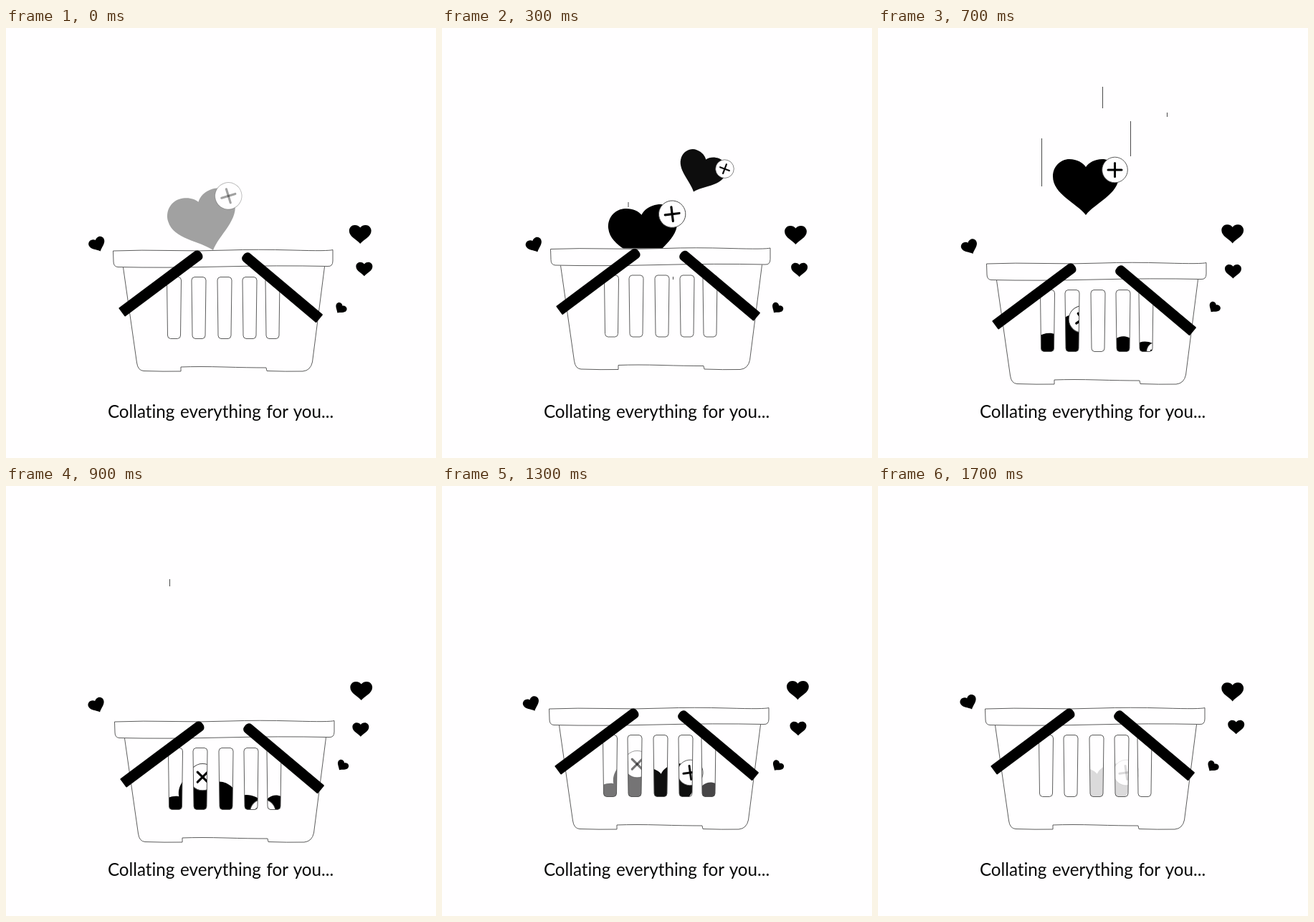
Write an HTML page with a canvas that moves like this. It is 600 px wide and 600 px high and loops after 1.8 s.

```html
<!DOCTYPE html>
<html lang="en">
<head>
<meta charset="utf-8">
<title>Collating</title>
<style>
  html, body { margin: 0; width: 600px; height: 600px; overflow: hidden; background: #fffeff; }
  canvas { display: block; }
  p {
    position: absolute; left: 0; top: 520px; width: 599px; margin: 0;
    font: 400 24.2px/30px Lato, sans-serif; word-spacing: 1.5px;
    font-variant-ligatures: none;
    text-align: center; white-space: nowrap; color: #080808;
  }
</style>
</head>
<body>
<canvas id="stage" width="600" height="600"></canvas>
<p>Collating everything for you...</p>
<script>
const ctx = document.getElementById('stage').getContext('2d');
const BG = '#fffeff', INK = '#000', LINE = '#4a4a4a';
const STEP = 100, STEPS = 18, FADE_IN = 2, FADE_OUT = 5;

// Tip at the origin, 92 wide, 78 high
const heartPath = new Path2D('M0 0C-13-17-46-29-46-54C-46-68-35-78-23-78' +
  'C-12-78-4-73 0-67C4-73 12-78 23-78C35-78 46-68 46-54C46-29 13-17 0 0Z');
const rimPath = new Path2D('M149.500 311Q190 309.500 230 310.500T310 310T400 310T456 309.500' +
  'L456 325Q456 333 449 332.500Q380 331 300 333T156 333.500Q150 333 150 326Z');
const bodyPath = new Path2D('M163.500 334L182.500 467Q184 478 192 478.500Q220 479.500 244 479' +
  'L244 473Q270 472 304 473T363 474L364 478.500Q390 479.500 414 479Q425 478 427.500 466L444.500 333');
const slots = [224.5, 259, 295, 330, 362].map(x => new Path2D(
  `M${x} 352q0-4 4-4.500h12q4 .5 4 4.500l-1 77q0 4-4 4.500h-10q-4-.5-4-4.500z`));

// Poses relative to the basket: step, tip x, tip y, turn
const hearts = [
  { scale: 1.05, born: -.74, leave: 10.7, holes: [0, 1],
    poses: [[0, 289, 310, -17], [3, 285, 333, -7], [5, 289, 465, -45], [7, 286, 467, -35], [9, 289, 465, -45]] },
  { scale: .72, born: 1.1, leave: 11.6, holes: [3, 4],
    poses: [[3, 349, 231, 21], [5, 353, 333, 0], [7, 347, 471, 13], [9, 384, 472, 10]] },
  { scale: 1, born: 3.2, leave: 12.7, holes: [2, 3, 4],
    poses: [[5, 289, 143, 8], [7, 288, 243, 0], [9, 293, 477, 25], [13, 315, 468, -8]] }
];
for (const h of hearts) {
  h.window = new Path2D();
  h.window.rect(0, -100, 600, 410);
  h.holes.forEach(i => h.window.addPath(slots[i]));
}

// Speed lines: x, then step, top, bottom at both ends of their life
const trails = [
  [260, [3, 243, 250], [5, 186, 217]],
  [322.5, [3, 347, 351], [5, 265, 335]],
  [352.5, [5, 213, 268], [7, 130, 179]],
  [403.5, [5, 127, 251], [7, 118, 124]],
  [228.5, [7, 154, 221], [9, 130, 140]],
  [313.5, [7, 82, 112], [8, 84, 95]]
];

// Hearts drifting on a slow sine
const floaters = [
  { scale: .25, turn: -24, x: 127.4, y: 304.5, dx: 2, dy: -2, lagX: 4, lagY: 0 },
  { scale: .335, turn: 0, x: 495, y: 287, dx: -1.5, dy: 2, lagX: 3, lagY: 3 },
  { scale: .25, turn: 0, x: 497.4, y: 338.3, dx: 2.5, dy: -1.8, lagX: 0, lagY: 0 },
  { scale: .18, turn: 36, x: 467.8, y: 391.2, dx: -1.3, dy: .7, lagX: 0, lagY: 0 }
];

const clamp = v => Math.min(1, Math.max(0, v));
const bump = (f, peak, width) => clamp(1 - Math.abs(f - peak) / width);
const wave = (f, lag) => Math.cos((f - lag) / STEPS * Math.PI * 2);

function ease(f, from, to) {
  const k = clamp((f - from) / (to - from));
  return k * k * (3 - 2 * k);
}

// Linear between key rows, held at both ends
function at(rows, f) {
  const i = Math.max(1, rows.findIndex(r => r[0] >= f));
  const past = f > rows[rows.length - 1][0];
  const a = rows[past ? rows.length - 2 : i - 1], b = rows[past ? rows.length - 1 : i];
  const k = clamp((f - a[0]) / (b[0] - a[0]));
  return a.slice(1).map((v, n) => v + (b[n + 1] - v) * k);
}

function scoped(x, y, turn, scale, draw) {
  ctx.save();
  ctx.translate(x, y);
  ctx.rotate(turn * Math.PI / 180);
  ctx.scale(scale, scale);
  draw();
  ctx.restore();
}

function segment(x1, y1, x2, y2) {
  ctx.beginPath();
  ctx.moveTo(x1, y1);
  ctx.lineTo(x2, y2);
  ctx.stroke();
}

function drawBadge(alpha) {
  ctx.beginPath();
  ctx.arc(0, 0, 17.8, 0, Math.PI * 2);
  ctx.fillStyle = BG;
  ctx.fill();
  ctx.globalAlpha = alpha;
  ctx.strokeStyle = LINE;
  ctx.lineWidth = .9;
  ctx.stroke();
  ctx.strokeStyle = INK;
  ctx.lineWidth = 3;
  ctx.lineCap = 'round';
  segment(-9.5, 0, 9.5, 0);
  segment(0, -9.5, 0, 9.5);
}

function drawHeart(h, f) {
  const alpha = clamp((f - h.born) / FADE_IN) * clamp(1 - (f - h.leave) / FADE_OUT);
  if (!alpha) return;
  const [x, y, turn] = at(h.poses, f);
  ctx.save();
  ctx.clip(h.window);
  scoped(x, y, turn, h.scale, () => {
    ctx.globalAlpha = alpha;
    ctx.fillStyle = INK;
    ctx.fill(heartPath);
    ctx.globalAlpha = 1;
    scoped(40.5, -63, 0, 1, () => drawBadge(alpha));
  });
  ctx.restore();
}

function drawHandle(x, y, turn) {
  scoped(x, y, turn, 1, () => {
    ctx.beginPath();
    ctx.roundRect(0, -7.5, 138.5, 15, [6, 1, 1, 6]);
    ctx.fillStyle = INK;
    ctx.fill();
  });
}

function drawBasket(f) {
  const x = 2 * (ease(f, 0, 3) - ease(f, 9, 13));
  const y = 18 * (ease(f, 4.6, 6.2) - ease(f, 9, 12)) - 2.5 * bump(f, 3, 2) + 8 * bump(f, 8, 1);
  const swing = 6 * bump(f, 5, 2) + 3 * bump(f, 8, 1);
  scoped(x, y, 0, 1, () => {
    hearts.forEach(h => drawHeart(h, f));
    ctx.strokeStyle = LINE;
    ctx.lineWidth = .9;
    [rimPath, bodyPath, ...slots].forEach(p => ctx.stroke(p));
    drawHandle(272.5, 314, 143.3 + swing);
    drawHandle(331.5, 316.5, 40.1 - swing);
  });
}

function render(f) {
  ctx.fillStyle = BG;
  ctx.fillRect(0, 0, 600, 600);

  drawBasket(f);

  ctx.strokeStyle = LINE;
  ctx.lineWidth = 1;
  for (const [x, first, last] of trails) {
    if (f < first[0] || f > last[0]) continue;
    const [top, bottom] = at([first, last], f);
    segment(x, top, x, bottom);
  }

  for (const { scale, turn, x, y, dx, dy, lagX, lagY } of floaters) {
    scoped(x + dx * wave(f, lagX), y + dy * wave(f, lagY), turn, scale, () => {
      ctx.translate(0, 39);
      ctx.fillStyle = INK;
      ctx.fill(heartPath);
    });
  }
}

let shown = -1;
function tick() {
  const f = Math.floor(performance.now() / STEP) % STEPS;
  if (f !== shown) render(shown = f);
  requestAnimationFrame(tick);
}
tick();
</script>
</body>
</html>
```
